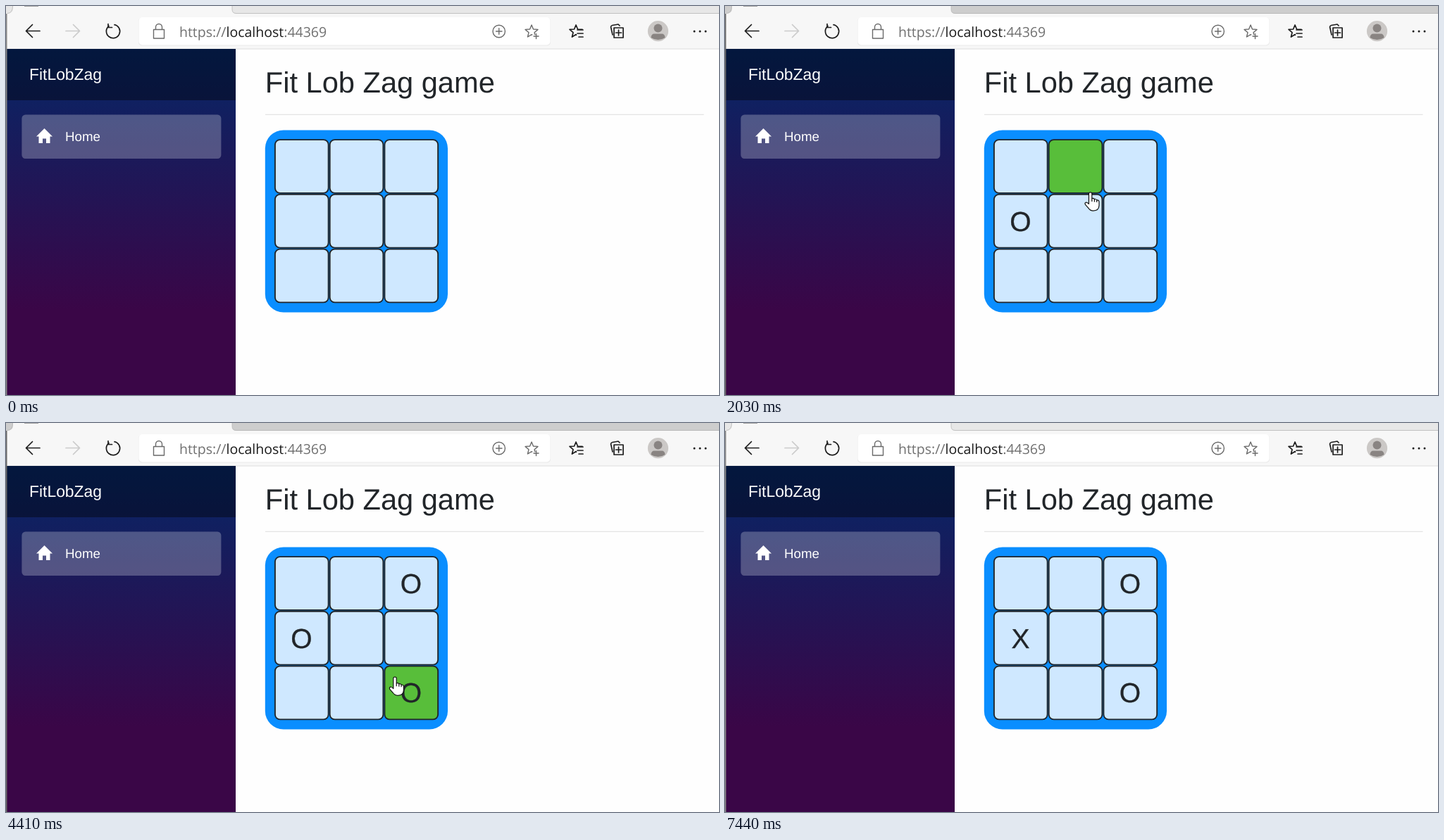
An HTML page that plays this animation: 1012x553 px, repeating every 7530 ms.

```html
<!DOCTYPE html>
<html lang="en">
<head>
<meta charset="utf-8">
<title>Board game</title>
<style>
  html, body { margin: 0; width: 100%; height: 100%; overflow: hidden; background: #fefefe; }
  svg { display: block; }
  text { font-family: "Liberation Sans", Arial, sans-serif; white-space: pre; text-rendering: geometricPrecision; }
  .url { font: 19.5px "Open Sans", "Noto Sans", sans-serif; fill: #707070; }
  .line { fill: none; stroke: #1c1c1c; stroke-width: 1.7; stroke-linecap: round; stroke-linejoin: round; }
  .soft { stroke: #6a6a6a; stroke-width: 1.4; }
  .pale { stroke: #cbcbcb; }
  .cell { fill: #cfe8ff; stroke: #212529; stroke-width: 1.9; }
  .cell.hover { fill: #58be3a; }
  .mark { font-size: 39px; text-anchor: middle; fill: #212529; stroke: #212529; stroke-width: .3; }
</style>
</head>
<body>
<svg width="1012" height="553" viewBox="0 0 1012 553">
  <defs>
    <linearGradient id="night" gradientUnits="userSpaceOnUse" x1="0" y1="61" x2="0" y2="431">
      <stop stop-color="#052767"/><stop offset="1" stop-color="#3a0647"/>
    </linearGradient>
    <path id="star" d="M0-9 2.5-3 9-2.6 4 1.7 5.6 8 0 4.6-5.6 8-4 1.7-9-2.6-2.5-3z"/>
  </defs>
  <rect width="1012" height="553" fill="#fefefe"/>

  <!-- browser chrome -->
  <rect id="strip" width="1012" height="11"/>
  <path d="M1 61V11Q10 11 10 3V0H321V5Q321 11 327 11H1012V61z" fill="#f7f7f7"/>
  <path d="M2 10.5Q9.5 10 9.5 0M321 0V5Q321 10.5 327 10.5H1012" fill="none" stroke="#b5b5b5" stroke-opacity=".75"/>
  <path d="M26 0H46" stroke="#888" stroke-width="1.5"/>
  <path d="M2 61H1012" stroke="#dedede"/>
  <rect x="188" y="16.5" width="585" height="40" rx="5" fill="#e9e9e9"/>
  <rect x="188.5" y="16" width="584" height="39.5" rx="5" fill="#fff"/>
  <path class="line" d="M48 35.5H28.5M37.5 26.5 28.5 35.5 37.5 44.5"/>
  <path class="line pale" d="M85 35.5H104.5M95.5 26.5 104.5 35.5 95.5 44.5"/>
  <path class="line" d="M146 28.5A9.6 9.6 0 1 0 154 26.6M145 25.5V30.5H150.5"/>
  <path class="line soft" d="M209.5 33.5H224.5V46H209.5zM212.5 33.5V30a4.5 4.5 0 0 1 9 0V33.5"/>
  <text class="url" x="246" y="43.5">https://<tspan fill="#1b1b1b">localhost</tspan>:44369</text>
  <circle class="line soft" cx="699.7" cy="36" r="8.7"/>
  <path class="line soft" d="M695.5 36H704M699.7 31.8V40.2"/>
  <use href="#star" class="line soft" x="746" y="36"/>
  <path d="M747 41h11v7h-11z" fill="#fff"/>
  <path class="line soft" d="M749 43H756M752.5 39.5V46.5"/>
  <use href="#star" class="line" x="809" y="36"/>
  <path d="M810 34h11v13h-11z" fill="#f7f7f7"/>
  <path class="line" d="M811 34H819M811 39H819M813 44H819"/>
  <path class="line" d="M863 31H876V45H863zM861 41 858.5 30Q858.5 28 860.5 27.5L869 26 871 28M865.5 38H873.5M869.5 34V42"/>
  <circle cx="925.5" cy="35.7" r="14.6" fill="#cbc8c6"/>
  <g fill="#898482">
    <circle cx="925.5" cy="31.5" r="6"/>
    <path d="M915.5 45Q916 39.5 920 39.5H931Q935 39.5 935.5 45 931 48 925.5 48T915.5 45z"/>
  </g>
  <g fill="#1c1c1c"><circle cx="977" cy="36" r="1.5"/><circle cx="985" cy="36" r="1.5"/><circle cx="993" cy="36" r="1.5"/></g>

  <!-- page -->
  <rect x="1" y="61" width="325" height="492" fill="url(#night)"/>
  <rect x="1" y="61" width="325" height="73" fill="#000" fill-opacity=".4"/>
  <rect id="edge" y="11" width="1.5" height="542"/>
  <text x="33" y="105.3" font-size="22.88" fill="#fff">FitLobZag</text>
  <rect x="22.4" y="154.6" width="283" height="62.4" rx="5.2" fill="#fff" fill-opacity=".25"/>
  <path d="M54.5 174 66 185.5H62.5V195H57V188.5H52V195H46.5V185.5H43z" fill="#fff"/>
  <text x="84" y="192" font-size="18.72" fill="#fff">Home</text>
  <text x="367.8" y="123" font-size="41.6" fill="#212529">Fit Lob Zag game</text>
  <rect x="368" y="153.7" width="622.5" height="1.3" fill="#e4e4e4"/>
  <rect x="367.8" y="176.4" width="259.2" height="259" rx="26" fill="#0a8eff"/>
  <g id="board"></g>

  <!-- pointer -->
  <g id="cursor">
    <g id="hand" fill="#fff" stroke="#111" stroke-width="1.2" stroke-linejoin="round">
      <path d="M-2.3 2.4a2.2 2.2 0 0 1 4.4 0V9q2.4-.6 3.6 1 2.2-.5 3.3 1.2 3.3-.2 3.3 3V19Q12 26.5 4 26.5-.5 26.5-3 22.5L-7 18q-1.6-2.4.3-3.4 1.8-.8 4.4 2.2z"/>
      <path d="M2.1 9V13.5M5.7 10V14M9 11.2V14.5" fill="none"/>
    </g>
    <path id="arrow" d="M0 0V21L5 16.5 8.500 24.5 12 23 8.600 15.2H15z" fill="#fff" stroke="#111" stroke-width="1.2"/>
    <circle id="press" r="15.8" fill="#ff0" fill-opacity=".5"/>
  </g>
</svg>
<script>
const LOOP = 7530, SIZE = 77.75, LEFT = 380.9, TOP = 189.1;
const SVG_NS = 'http://www.w3.org/2000/svg';

// start, end, pointer samples, target x, target y
const MOVES = [
  [240, 930, 10, 426.5, 306.5],
  [1490, 2190, 10, 551, 250],
  [2250, 2420, 3, 583, 232.5],
  [3040, 3490, 7, 582, 374.5],
  [4200, 4730, 8, 431, 305.5],
  [5340, 5830, 7, 438, 384],
  [6060, 6290, 4, 775, 600]
];
const ENTRY = [693, 538];
const PRESSES = [[1080, 1250], [2720, 2890], [3810, 3970], [4960, 5040]];
// time, cell index, mark
const MARKS = [[1310, 3, 'O'], [2890, 2, 'O'], [3970, 8, 'O'], [5040, 3, 'X']];

const byId = id => document.getElementById(id);
const [strip, edge, board, cursor, hand, arrow, press] =
  ['strip', 'edge', 'board', 'cursor', 'hand', 'arrow', 'press'].map(byId);

function add(tag, attrs) {
  const el = document.createElementNS(SVG_NS, tag);
  for (const key in attrs) el.setAttribute(key, attrs[key]);
  return board.appendChild(el);
}

const cells = Array.from({ length: 9 }, (_, i) => {
  const x = LEFT + SIZE * (i % 3), y = TOP + SIZE * Math.floor(i / 3);
  return {
    box: add('rect', { class: 'cell', x: x + 1, y: y + 1, width: SIZE - 2, height: SIZE - 2, rx: 7 }),
    label: add('text', { class: 'mark', x: x + SIZE / 2 - .3, y: y + 52.8 })
  };
});

const smooth = p => p * p * (3 - 2 * p);
const within = (t, [from, to]) => t >= from && t < to;
const show = (el, on) => el.setAttribute('visibility', on ? 'visible' : 'hidden');

function pointerAt(t) {
  let [x, y] = ENTRY;
  for (const [start, end, samples, tx, ty] of MOVES) {
    if (t < start) break;
    const raw = Math.min(1, (t - start) / (end - start));
    const p = smooth(Math.floor(raw * (samples - 1) + 1e-6) / (samples - 1));
    x += (tx - x) * p;
    y += (ty - y) * p;
  }
  return [x, y];
}

function cellAt(x, y) {
  const col = Math.floor((x - LEFT) / SIZE), row = Math.floor((y - TOP) / SIZE);
  return col >= 0 && col < 3 && row >= 0 && row < 3 ? row * 3 + col : -1;
}

function draw(t) {
  const focused = within(t, [1080, 7440]);
  const visible = within(t, [240, 6290]);
  const [x, y] = pointerAt(t);
  const hovered = visible ? cellAt(x, y) : -1;

  strip.setAttribute('fill', focused ? '#cdcdcd' : '#e7e7e7');
  edge.setAttribute('fill', focused ? '#666' : '#858585');

  const marks = Array(9).fill('');
  for (const [time, cell, mark] of MARKS) if (t >= time) marks[cell] = mark;
  cells.forEach(({ box, label }, i) => {
    box.classList.toggle('hover', i === hovered);
    if (label.textContent !== marks[i]) label.textContent = marks[i];
  });

  cursor.setAttribute('transform', `translate(${x.toFixed(1)} ${y.toFixed(1)})`);
  show(hand, visible && hovered >= 0);
  show(arrow, visible && hovered < 0);
  show(press, PRESSES.some(span => within(t, span)));
}

const begin = performance.now();
function tick() {
  draw((performance.now() - begin) % LOOP);
  requestAnimationFrame(tick);
}
tick();
</script>
</body>
</html>
```
